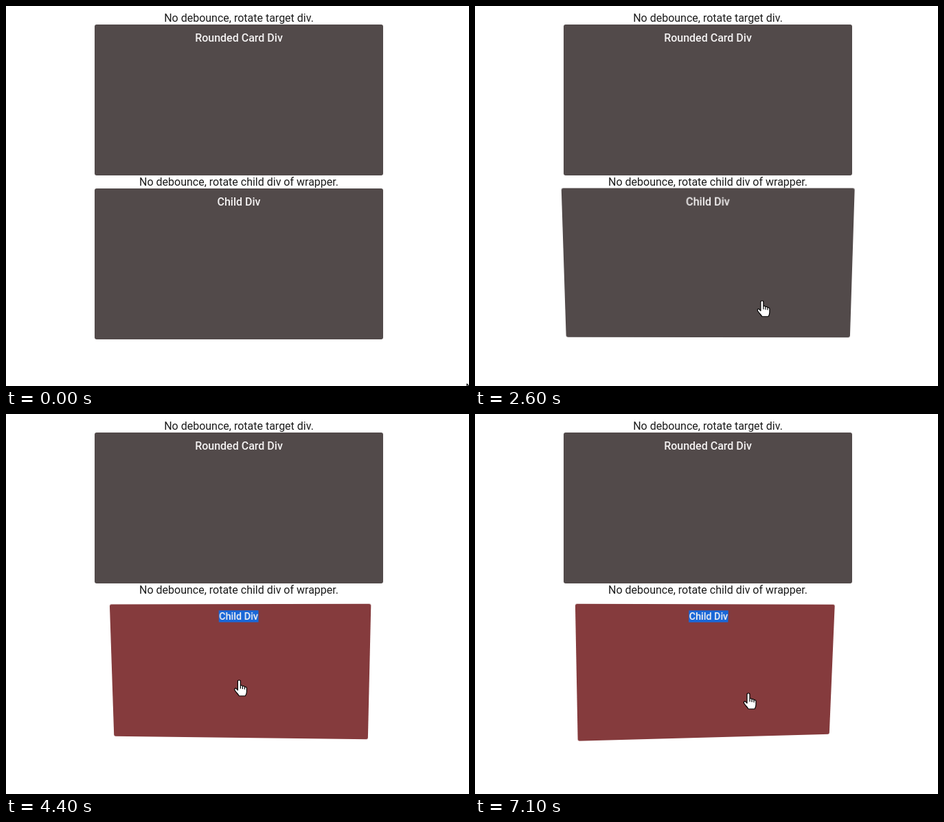
An HTML page for the animation above (7200 ms loop, 674 by 554 pixels).

```html
<!DOCTYPE html>
<html lang="en">
<head>
<meta charset="utf-8">
<title>Tilting cards</title>
<style>
  html, body { margin: 0; width: 100%; height: 100%; overflow: hidden; background: #fff; }
  body { position: relative; font: 16px/19px Roboto, sans-serif; color: #1c1c1c; }
  .caption { position: absolute; left: 0; width: 678px; text-align: center; }
  .card {
    position: absolute; left: 129px; width: 420px; height: 220px;
    box-sizing: border-box; padding-top: 10px; border-radius: 3px;
    background: #524a4a; color: #f4f2f2; font-weight: 500; text-align: center;
  }
  svg { position: absolute; left: 0; top: 0; width: 674px; height: 554px; overflow: hidden; }
  svg path { fill: #fff; stroke: #000; stroke-width: 1.2; stroke-linejoin: round; }
</style>
</head>
<body>
<div class="caption" style="top:8px">No debounce, rotate target div.</div>
<div class="caption" style="top:247px">No debounce, rotate child div of wrapper.</div>
<div class="card" id="upper" style="top:27px">Rounded Card Div</div>
<div class="card" id="lower" style="top:266px"><span id="label">Child Div</span></div>
<svg viewBox="0 0 674 554">
  <path id="arrow" d="M0 0V16.5L3.8 13L6.5 19.3L9 18.2L6.4 12.2H11.6Z"/>
  <path id="hand" d="M-2 2Q-2 0 0 0Q2 0 2 2V8Q4.5 7 5 9Q7.5 8 8 10Q11 9.5 11 12V17Q11 20 9 23H0Q-2 20 -4 18L-6.5 14.5Q-7 11.5 -4.5 12L-2 14.5ZM2 8V12.5M5 9V13M8 10V13.5"/>
</svg>
<script>
const LOOP = 7200, STEP = 100, LAG = 200;
const $ = id => document.getElementById(id);

// Pointer stops: time, x, y
const stops = [
  [0, 671, 551], [700, 251, 73], [900, 357, 98], [1600, 240, 230], [1800, 228, 362],
  [2000, 229, 389], [2900, 484, 444], [3600, 266, 441], [3800, 236, 438], [4900, 418, 350],
  [5100, 468, 372], [6000, 240, 420], [6900, 438, 415], [7100, 398, 407]
];

const ramp = (t, from, to) => Math.min(1, Math.max(0, (t - from) / (to - from)));
const mix = (a, b, k) => a + (b - a) * k;
const smooth = k => k * k * (3 - 2 * k);

function pointerAt(t) {
  const next = Math.max(1, stops.findIndex(stop => stop[0] >= t));
  const [t0, x0, y0] = stops[next - 1], [t1, x1, y1] = stops[next];
  const k = smooth(ramp(t, t0, t1));
  return [mix(x0, x1, k), mix(y0, y1, k)];
}

// The side under the trailing pointer is pushed away from the viewer
function tilt(card, centerY, t, amount, scale) {
  const [x, y] = pointerAt(t - LAG);
  const pitch = (y - centerY) * 0.0042 * amount;
  const yaw = (x - 339) * 0.00153 * amount;
  const angle = Math.hypot(pitch, yaw);
  card.style.transform =
    `perspective(1000px) rotate3d(${-pitch}, ${yaw}, 0, ${angle}rad) scale(${scale})`;
}

function draw(now) {
  const t = Math.floor(now % LOOP / STEP) * STEP;
  const [x, y] = pointerAt(t);

  tilt($("upper"), 137, t, ramp(t, 300, 800) * (1 - ramp(t, 1600, 1900)), 1);
  tilt($("lower"), 376, t, ramp(t, 1830, 2430), 1 - 0.105 * ramp(t, 3600, 4100));

  const red = ramp(t, 3400, 3700);
  const color = [[82, 133], [74, 59], [74, 61]].map(([a, b]) => Math.round(mix(a, b, red)));
  $("lower").style.background = `rgb(${color})`;
  $("label").style.background = t >= 4400 ? "#1967d8" : "none";

  for (const id of ["arrow", "hand"]) {
    $(id).style.display = (id === "hand") === (t >= 1700) ? "inline" : "none";
    $(id).setAttribute("transform", `translate(${x} ${y})`);
  }
}

const start = performance.now();
function frame() {
  draw(performance.now() - start);
  requestAnimationFrame(frame);
}
frame();
</script>
</body>
</html>
```
